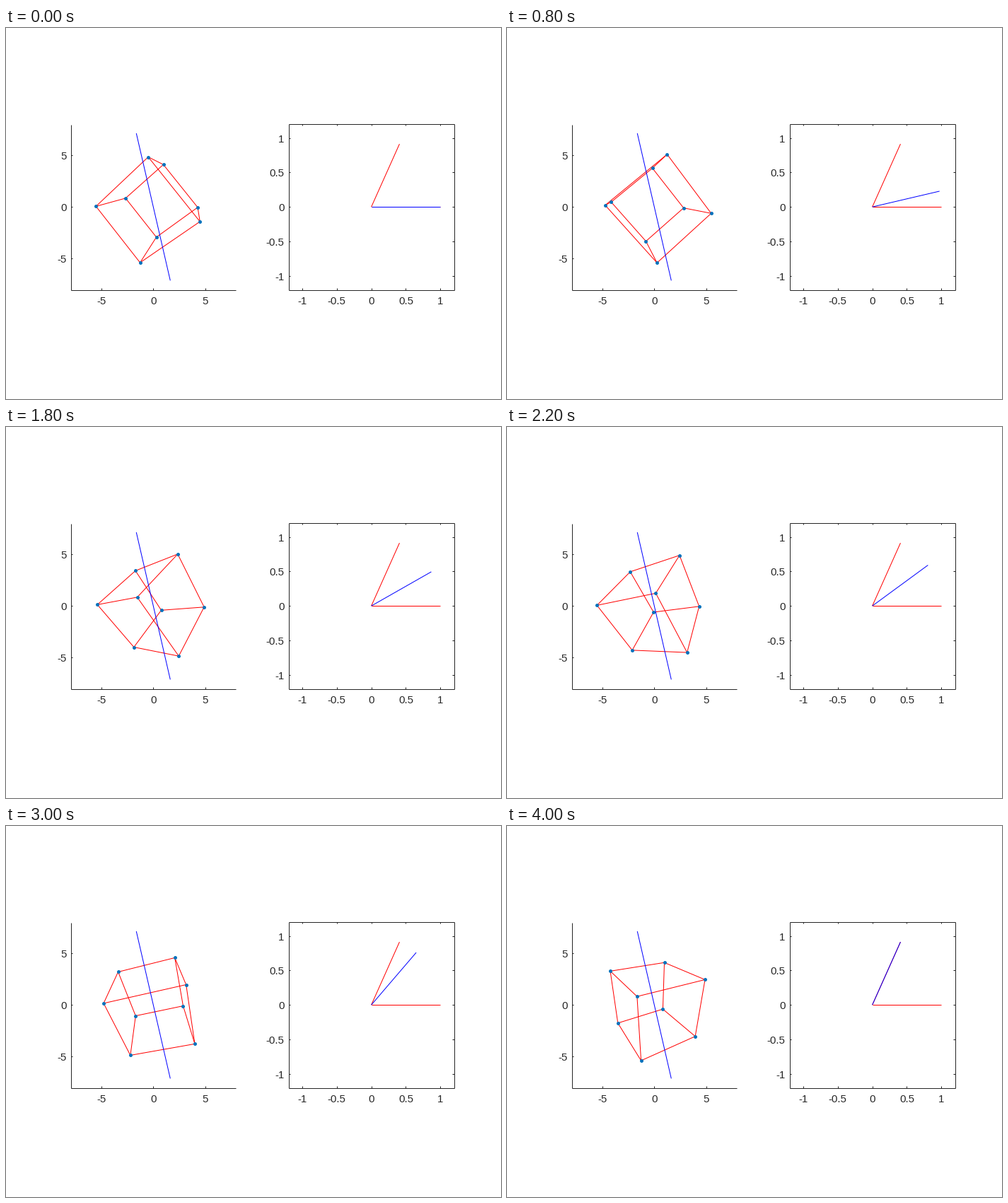
Recreate the animation shown at these times as a matplotlib script. Size 700 by 525 pixels, loop 4.1 s.

```python
import itertools

import matplotlib
import matplotlib.pyplot as plt
import numpy as np
from matplotlib.animation import FuncAnimation

W, H, DPI = 700, 525, 100
STEPS = 40
PT = 72 / DPI  # points per pixel
INK = "#262626"
RED, BLUE, DOT = "#ff0000", "#0000ff", "#0072bd"
CY = 253.2
LEFT_X, LEFT_UNIT = 208.3, 14.64
RIGHT_X, RIGHT_UNIT = 516.6, 97.6
CAMERA = 15.0

matplotlib.rcParams["font.family"] = "Liberation Sans"

fig = plt.figure(figsize=(W / DPI, H / DPI), dpi=DPI, facecolor="white")
ax = fig.add_axes([0, 0, 1, 1])
ax.set_xlim(0, W)
ax.set_ylim(H, 0)
ax.axis("off")


def line(xs, ys, color, z=2):
    return ax.plot(xs, ys, color=color, lw=PT, zorder=z,
                   solid_capstyle="butt")[0]


def label(x, baseline, text, ha):
    ax.text(x, baseline, text, ha=ha, va="baseline", color=INK,
            fontsize=15 * PT)


def axes_frame(x0, x1, top, cx, unit, ticks, boxed):
    bottom, tick = 370.5, 2.5
    line([x0, x0], [top, bottom + 0.5], INK)
    line([x0, x1], [bottom, bottom], INK)
    if boxed:
        line([x1, x1], [top, bottom + 0.5], INK)
        line([x0, x1], [top, top], INK)
    for v in ticks:
        x, y = cx + v * unit, CY - v * unit
        line([x, x], [bottom, bottom - tick], INK)
        line([x0, x0 + tick], [y, y], INK)
        if boxed:
            line([x, x], [top, top + tick], INK)
            line([x1, x1 - tick], [y, y], INK)
        label(x, 391.3, f"{v:g}", "center")
        label(x0 - 6, y + 6, f"{v:g}", "right")


axes_frame(91.5, 324.5, 136.5, LEFT_X, LEFT_UNIT, (-5, 0, 5), False)
axes_frame(399.5, 633.5, 135.5, RIGHT_X, RIGHT_UNIT,
           (-1, -0.5, 0, 0.5, 1), True)

# Rotation axis n and the cube edges at the start, in camera space.
n = np.array([-0.2232, 0.9683, 0.1132])
n /= np.linalg.norm(n)
e1 = np.array([0.2455, 0.1681, -0.9547])
e1 -= n * (e1 @ n)
e1 /= np.linalg.norm(e1)
m = np.cross(n, e1)
e2 = (n - 2 * m) / np.sqrt(5)
e3 = (2 * n + m) / np.sqrt(5)

signs = np.array(list(itertools.product((-1, 1), repeat=3)))
cube = 3 * signs @ np.array([e1, e2, e3])
edges = [(a, b) for a, b in itertools.combinations(range(8), 2)
         if np.sum(signs[a] != signs[b]) == 1]

# Angle between the two unit quaternions; the cube turns by twice that.
HALF = np.arccos(1 / np.sqrt(6))


def rotate(points, angle):
    c, s = np.cos(angle), np.sin(angle)
    along = np.outer(points @ n, n)
    return points * c + np.cross(n, points) * s + along * (1 - c)


def project(points):
    scale = LEFT_UNIT * CAMERA / (CAMERA - points[:, 2])
    return LEFT_X + points[:, 0] * scale, CY - points[:, 1] * scale


def arm(angle):
    return ([RIGHT_X, RIGHT_X + RIGHT_UNIT * np.cos(angle)],
            [CY, CY - RIGHT_UNIT * np.sin(angle)])


edge_lines = [line([], [], RED, 3) for _ in edges]
reach = np.array([-7.35, 7.35]) * LEFT_UNIT
line(LEFT_X + reach * n[0], CY - reach * n[1], BLUE, 4)
dots = ax.plot([], [], "o", color=DOT, ms=5 * PT, mew=0, zorder=5)[0]

line(*arm(0), RED, 3)
line(*arm(HALF), RED, 3)
hand = line([], [], BLUE, 4)


def draw(k):
    angle = HALF * k / STEPS
    xs, ys = project(rotate(cube, 2 * angle))
    for artist, (a, b) in zip(edge_lines, edges):
        artist.set_data([xs[a], xs[b]], [ys[a], ys[b]])
    dots.set_data(xs, ys)
    hand.set_data(*arm(angle))
    return [*edge_lines, dots, hand]


anim = FuncAnimation(fig, draw, frames=STEPS + 1, interval=100, repeat=True,
                     repeat_delay=0, blit=False)
plt.show()
```
